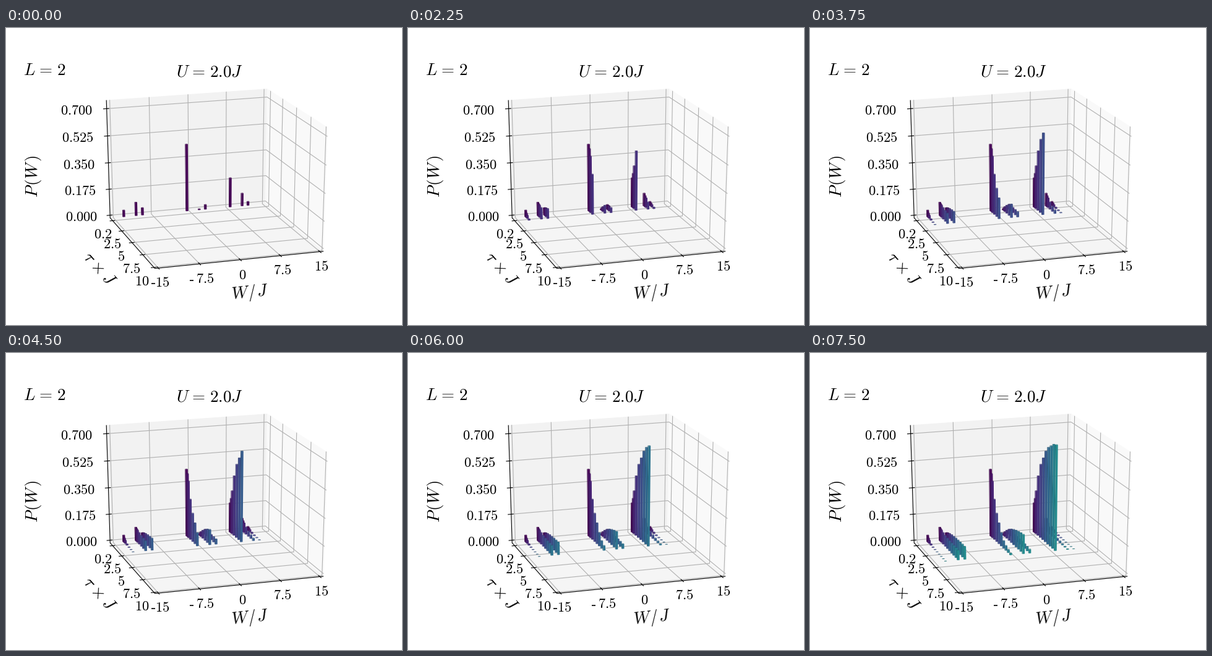
A matplotlib script for the animation above (8000 ms loop, 640x480 px).

```python
import numpy as np
import matplotlib.pyplot as plt
from matplotlib.animation import FuncAnimation

plt.rcParams["mathtext.fontset"] = "cm"
WIDTH, HEIGHT = 640, 480
XE, Y0, Y1, Z0, Z1 = 15.625, -0.45, 10.2, -0.018, 0.752

# Camera anchors: work, time, probability -> screen x, y
ANCHORS = np.array([
    (-XE, Y0, Z1, 161.5, 117), (0, Y0, Z1, 294, 107.5), (XE, Y0, Z1, 422, 98),
    (-XE, Y0, 0.7, 162, 130), (-XE, Y0, 0.35, 164.7, 217), (-XE, Y0, 0, 167.5, 302),
    (XE, Y0, 0.7, 421.3, 111), (XE, Y0, 0.35, 420, 196), (XE, Y0, 0, 418, 279),
    (-7.5, Y0, Z0, 235, 300.5), (0, Y0, Z0, 295, 295), (7.5, Y0, Z0, 355, 289.5),
    (-XE, Y1, Z0, 240, 388), (0, Y1, Z0, 379, 374.5), (XE, Y1, Z0, 512, 361),
    (-XE, 5, Z0, 203, 345.5), (XE, 5, Z0, 464.5, 320.5),
    (XE, Y1, Z1, 518, 160), (XE, Y1, 0.35, 515.3, 267), (XE, 5, Z1, 470, 129),
])


def fit_camera(anchors):
    rows, vals = [], []
    for x, y, z, u, v in anchors:
        p = np.array([x / 15, y / 10, z, 1])
        u, v = u / WIDTH, v / WIDTH
        rows.append(np.r_[p, np.zeros(4), -u * p[:3]])
        rows.append(np.r_[np.zeros(4), p, -v * p[:3]])
        vals += [u, v]
    sol = np.linalg.lstsq(np.array(rows), np.array(vals), rcond=None)[0]
    return np.append(sol, 1).reshape(3, 4)


CAMERA = fit_camera(ANCHORS)


def project(x, y, z):
    u, v, w = CAMERA @ np.array([x / 15, y / 10, z, 1])
    return u / w * WIDTH, v / w * WIDTH


fig = plt.figure(figsize=(6.4, 4.8), dpi=100, facecolor="white")
ax = fig.add_axes([0, 0, 1, 1])
ax.set_xlim(-0.5, WIDTH - 0.5)
ax.set_ylim(HEIGHT - 0.5, -0.5)
ax.axis("off")


def line(*pts, color="#b0b0b0", order=2):
    xs, ys = zip(*[project(*p) for p in pts])
    ax.plot(xs, ys, color=color, lw=0.8, zorder=order)


def face(pts, color, order, lw=0):
    patch = plt.Polygon([project(*p) for p in pts], facecolor=color,
                        edgecolor=color, lw=lw, zorder=order)
    return ax.add_patch(patch)


def label(x, y, text, size=16.2, **kw):
    kw = {"ha": "center", "va": "baseline", **kw}
    ax.text(x, y, f"${text}$", fontsize=size, color="black", zorder=5, **kw)


# Panes
face([(-XE, Y0, Z0), (XE, Y0, Z0), (XE, Y0, Z1), (-XE, Y0, Z1)], "0.95", 1, 0.8)
face([(XE, Y0, Z0), (XE, Y1, Z0), (XE, Y1, Z1), (XE, Y0, Z1)], "0.975", 1, 0.8)
face([(-XE, Y0, Z0), (XE, Y0, Z0), (XE, Y1, Z0), (-XE, Y1, Z0)], "0.9625", 1, 0.8)

# Grid and tick marks
for x in (-15, -7.5, 0, 7.5, 15):
    line((x, Y0, Z1), (x, Y0, Z0), (x, Y1, Z0))
    line((x, Y1 - 0.25, Z0), (x, Y1 + 0.2, Z0), color="black", order=3)
for y in (0.2, 2.5, 5, 7.5, 10):
    line((-XE, y, Z0), (XE, y, Z0), (XE, y, Z1))
    line((-XE - 0.5, y, Z0), (-XE + 0.4, y, Z0), color="black", order=3)
for z in (0, 0.175, 0.35, 0.525, 0.7):
    line((-XE, Y0, z), (XE, Y0, z), (XE, Y1, z))
    line((-XE - 0.6, Y0, z), (-XE + 0.4, Y0, z), color="black", order=3)
line((-XE, Y0, Z1), (-XE, Y0, Z0), (-XE, Y1, Z0), (XE, Y1, Z0),
     color="black", order=3)

# Tick labels
for x, y, text in [
    (114, 140, "0.700"), (116, 184, "0.525"), (118, 227, "0.350"),
    (120, 269, "0.175"), (122, 311, "0.000"),
    (156.5, 339, "0.2"), (171, 356, "2.5"), (186, 375, "5"),
    (202.5, 395, "7.5"), (219.5, 415, "10"),
    (252, 417.5, "15"), (321.5, 412, "7.5"), (381.7, 405, "0"),
    (446.5, 398, "7.5"), (509.2, 391, "15"),
]:
    label(x, y, text)
for x, y in ((234.5, 412.5), (296, 407)):
    ax.plot([x, x + 6], [y, y], color="black", lw=1.2,
            solid_capstyle="butt", zorder=5)


def gap(em):
    return rf"\hspace{{{em}}}"


# Titles and axis names
EQ = gap(0.11) + "=" + gap(0.11)
BIG = 19.5
label(27.5, 76, "L" + EQ + "2", BIG, ha="left")
label(328.7, 78, "U" + EQ + "2.0J", BIG)
label(44, 239, f"P{gap(0.1)}(W{gap(0.1)})", BIG, va="center", rotation=90)
label(394.5, 428, f"W{gap(0.05)}/{gap(0.05)}J", BIG, va="center", rotation=6)
label(150.5, 389, rf"\tau{gap(0.08)} \times {gap(0.05)}J", BIG,
      va="center", rotation=-48)

# Work distribution for each quench time
TAUS = np.r_[0.2, 0.4, 0.6, np.arange(1, 4.6, 0.5)]
S = TAUS - 0.2
FALL = [.447, .423, .379, .270, .190, .140, .089, .050, .032, .020, .012]
RISE = [.199, .234, .290, .400, .488, .542, .598, .634, .655, .676, .685]
PEAKS = [
    (-13.41, 0.045 * np.exp(-1.9 * S)),
    (-11.0, 0.064 + 0.026 * np.exp(-0.8 * S)),
    (-9.75, 0.086 - 0.036 * np.exp(-0.8 * S)),
    (-0.93, FALL),
    (1.52, 0.14 - 0.133 * np.exp(-0.55 * S)),
    (2.75, 0.036 - 0.0014 * (TAUS - 1.8) ** 2),
    (7.77, RISE),
    (10.2, 0.087 * np.exp(-0.7 * S)),
    (11.4, 0.027 * np.exp(-1.1 * S)),
]
CMAP = plt.get_cmap("viridis")
DEPTH = 0.12


def bar(w, t, h, color, order):
    a, b, back = w - 0.19, w + 0.25, t - DEPTH
    dark = np.array(color[:3]) * 0.8
    return [
        face([(a, back, 0), (a, t, 0), (a, t, h), (a, back, h)], dark, order),
        face([(a, back, h), (b, back, h), (b, t, h), (a, t, h)], dark, order),
        face([(a, t, 0), (b, t, 0), (b, t, h), (a, t, h)], color, order),
    ]


rows = []
for k, t in enumerate(TAUS):
    row = []
    for w, probs in PEAKS:
        row += bar(w, t, probs[k], CMAP(k / 21), 4 + k / 100)
    rows.append(row)


def update(frame):
    last = frame // 3
    for k, row in enumerate(rows):
        for patch in row:
            patch.set_visible(k <= last)
    return [p for row in rows for p in row]


anim = FuncAnimation(fig, update, frames=32, interval=250, repeat=True,
                     repeat_delay=0, blit=False)
plt.show()
```
